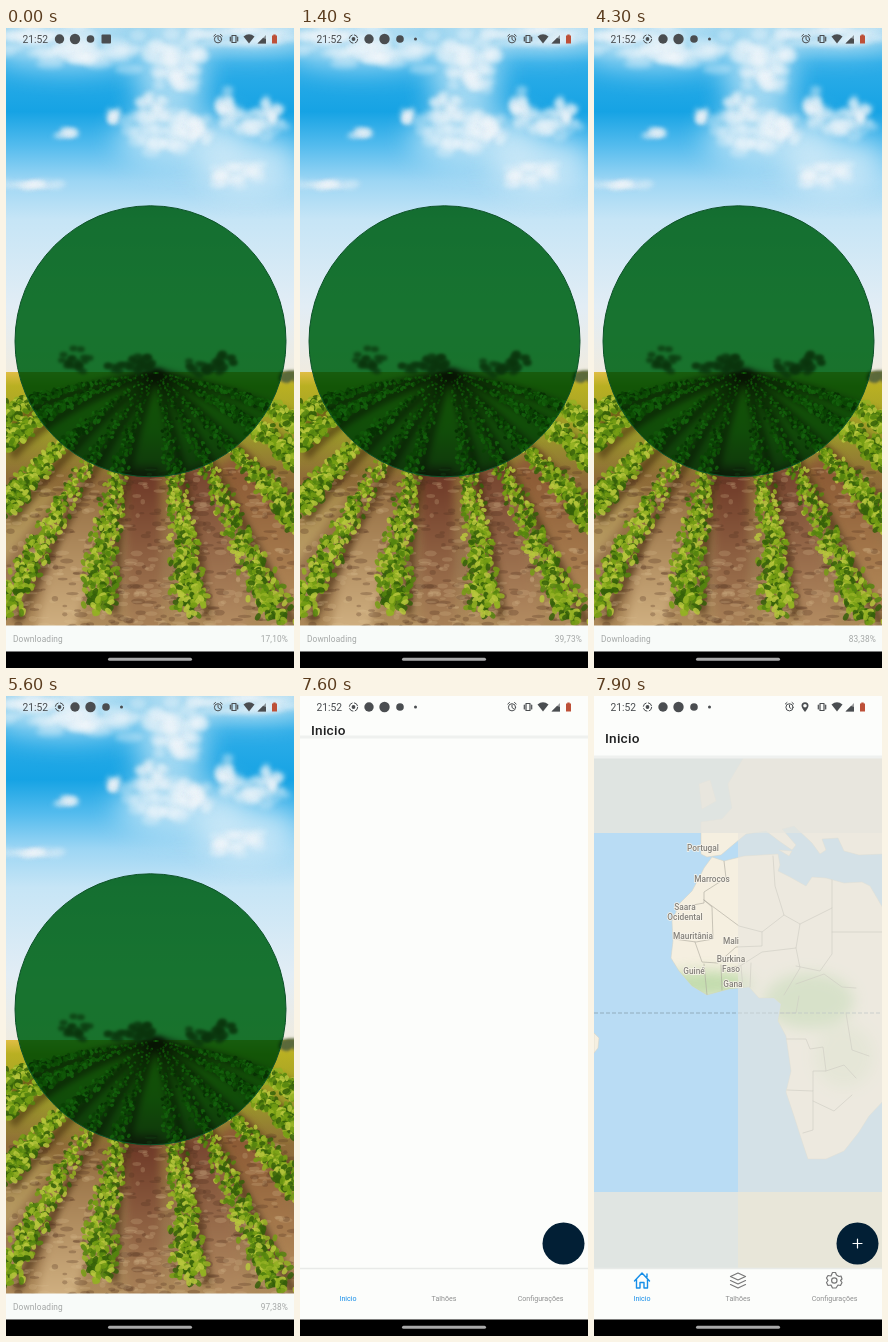
These frames come from a looping animation (288 by 640 pixels, 8000 ms). An HTML page with a canvas:

```html
<!DOCTYPE html>
<html lang="pt">
<head>
<meta charset="utf-8">
<style>
html, body { margin: 0; width: 100%; height: 100%; overflow: hidden; background: #fcfdfb; }
canvas, svg { position: absolute; left: 0; top: 0; display: block; }
text { font-family: Roboto, sans-serif; }
.line { fill: none; stroke-linejoin: round; stroke-linecap: round; }
.mid { text-anchor: middle; }
.places { font-size: 8.3px; font-weight: 500; fill: #85827c; paint-order: stroke; stroke: #f8f4ea; stroke-width: 1.5px; }
</style>
</head>
<body>
<canvas id="photo" width="288" height="640"></canvas>
<svg width="288" height="640" viewBox="0 0 288 640">
  <defs>
    <filter id="soft" x="-50%" y="-50%" width="200%" height="200%"><feGaussianBlur stdDeviation="7"/></filter>
    <clipPath id="mapClip"><rect y="61" width="288" height="512"/></clipPath>
    <clipPath id="landClip"><use href="#africa"/></clipPath>
  </defs>

  <g id="download">
    <rect y="597.5" width="288" height="26" fill="#f8fbf9"/>
    <g font-size="8.3" fill="#a3a6a5" letter-spacing=".15">
      <text x="7" y="613.5">Downloading</text>
      <text id="percent" x="282" y="613.5" text-anchor="end"></text>
    </g>
  </g>

  <g id="home">
    <rect width="288" height="624" fill="#fcfdfb"/>
    <g id="map" clip-path="url(#mapClip)">
      <rect y="61" width="288" height="512" fill="#b9dcf4"/>
      <g fill="#f5efe0" stroke="#d5d3c4" stroke-width=".5">
        <path id="africa" d="M118 161L130 165 150 160 184 158 186 169 184 175 196 181 212 190 218 181 232 182 250 187 268 186 276 190 290 214V404L275 420 265 436 250 455 232 463 214 463 208 445 200 420 192 396 197 375 192 340 184 325 187 308 180 302 165 302 155 291 135 293 113 299 98 290 85 275 77 262 79 245 78 225 86 207 98 195 106 180 110 172Z"/>
        <path d="M107 137L107 158 113 161 127 159 140 148 152 138 172 135 185 145 198 154 202 149 188 133 200 130 218 147 226 158 232 154 228 143 244 142 250 155 265 159 290 158V61H150L134 88 138 112 128 123 107 126Z"/>
        <path d="M105 88L116 84 122 105 108 113ZM185 154L198 155 195 160ZM0 337L5 342 4 352 0 357Z"/>
      </g>
      <g clip-path="url(#landClip)">
        <g fill="#b5d7a0" filter="url(#soft)" opacity=".8">
          <ellipse cx="112" cy="288" rx="48" ry="13"/>
          <ellipse cx="215" cy="305" rx="45" ry="28"/>
          <ellipse cx="250" cy="360" rx="30" ry="32" opacity=".35"/>
        </g>
        <path class="line" stroke="#aaa69a" stroke-width=".6" d="M130 165L132 182 110 196 110 207 88 211M110 204L145 230 168 236 190 219 181 190 179 160M110 204L118 211 119 243 102 246 80 243M101 246L108 266 124 267 142 251 168 250 168 236M190 219L206 228 202 252 168 256 146 270 128 273M206 228L238 212 238 182M238 236H290M238 212V258L226 275 202 270M202 252L206 272 190 299M202 288L230 278 248 291 262 292M184 317H202L205 300M190 343H212L216 353 229 351 232 375H219V395L193 394M219 395V434L209 437M232 375L250 369 262 382M219 405L240 415 258 399M252 317L258 354 275 360M110 268L113 299M127 269L128 294M147 270L149 292M157 267L156 291"/>
      </g>
      <path stroke="#8299a4" stroke-width=".7" stroke-dasharray="4 2" d="M0 317H288"/>
      <g fill="#e7e6de">
        <path d="M0 61H288V137H0Z" opacity=".85"/>
        <path d="M144 137H288V496H144Z" opacity=".58"/>
      </g>
      <path d="M0 496H144V573H0Z" fill="#e0e5e2"/>
      <path d="M144 496H288V573H144Z" fill="#e8e6d9"/>
      <g class="places mid" id="places"></g>
    </g>
    <g id="header">
      <rect width="288" height="41" fill="#fcfdfb"/>
      <path d="M0 41H288" stroke="#eff1ef" stroke-width="3"/>
      <text id="title" x="11" font-size="13.6" font-weight="500" letter-spacing=".25" fill="#1d1e1f">Inicio</text>
    </g>
    <rect width="288" height="22" fill="#fcfdfb"/>
    <rect y="572" width="288" height="52" fill="#fcfdfb"/>
    <path d="M0 572.5H288" stroke="#e8eae8" stroke-width="1.5"/>
    <circle cx="263.5" cy="547.5" r="21" fill="#021f35"/>
    <g class="mid" font-size="7.1" fill="#8f9090">
      <text x="48" y="604.5" fill="#168ee8">Inicio</text>
      <text x="144" y="604.5">Talhões</text>
      <text x="240.5" y="604.5">Configurações</text>
    </g>
    <g id="icons" class="line" stroke="#777" stroke-width="1.2">
      <path stroke="#fff" d="M259 547.5H268M263.5 543V552"/>
      <path stroke="#168ee8" stroke-width="1.4" d="M40.5 585L48 577 55.5 585M42.5 583.5V592H46V586.5H50V592H53.5V583.5M53 581V578"/>
      <path d="M136.5 580.5L144 577 151.5 580.5 144 584ZM136.5 584.5L144 588 151.5 584.5M136.5 588.5L144 592 151.5 588.5"/>
      <path d="M238.5 576.5H241.5L242.5 579 245 580.5 247 580 248 583 246.5 584.5 248 586.5 246.5 589.5 244 589 242 592H238.5L237 589 234 589.5 232.5 586.5 234 584.5 232.5 582 234 579.5 237 580Z"/>
      <circle cx="240.3" cy="584.5" r="2.7"/>
    </g>
  </g>

  <g id="status" fill="#4a4d50">
    <text x="16.5" y="14.7" font-size="10.3">21:52</text>
    <g id="apps">
      <circle cx="69" cy="11" r="4.7"/>
      <circle cx="84.5" cy="11" r="5.2"/>
      <circle cx="100" cy="11" r="3.8"/>
    </g>
    <rect id="screen" x="95.5" y="6.5" width="9.5" height="9" rx="1"/>
    <g id="recording">
      <circle cx="53.5" cy="11" r="4.2" fill="none" stroke="#4a4d50" stroke-dasharray="5 1.6"/>
      <circle cx="53.5" cy="11" r="1.9"/>
      <circle cx="115.5" cy="11" r="1.5"/>
    </g>
    <g id="alarm" class="line" stroke="#4a4d50">
      <circle cx="212" cy="11.3" r="3.6"/>
      <path d="M212 9V11.5L213.5 12.5M207.8 8L209.5 6.5M216.2 8L214.5 6.5"/>
    </g>
    <path id="pin" fill-rule="evenodd" d="M211 16Q207.5 11.5 207.5 9.8A3.5 3.5 0 0 1 214.5 9.8Q214.5 11.5 211 16ZM211 8A1.8 1.8 0 1 0 211 11.6 1.8 1.8 0 0 0 211 8Z"/>
    <path class="line" stroke="#4a4d50" stroke-width="1.2" d="M226 7.5H230V14.5H226ZM224.3 9V13M231.7 9V13"/>
    <path d="M237.5 8.5Q243 4 248.5 8.5L243 15.5Z"/>
    <path d="M260 7V15.5H251.5Z" opacity=".55"/>
    <path d="M260 11V15.5H251.5L257 10Z"/>
    <path d="M266 7.5H267.3V6.5H269.7V7.5H271V15.5H266Z" fill="#bd5038"/>
  </g>
  <path d="M0 623.5H288V640H0Z"/>
  <rect x="102" y="629.8" width="84" height="3" rx="1.5" fill="#a9a9a9"/>
</svg>

<script>
const $ = id => document.getElementById(id);
const g = $('photo').getContext('2d');

let seed = 7;
const random = () => (seed = seed * 16807 % 2147483647) / 2147483647;
const spread = r => (random() + random() - 1) * r;
const pick = list => list[random() * list.length | 0];

function ramp(y0, y1, stops) {
  const fill = g.createLinearGradient(0, y0, 0, y1);
  stops.forEach(([at, colour]) => fill.addColorStop(at, colour));
  return fill;
}

function band(y0, y1, stops) {
  g.fillStyle = ramp(y0, y1, stops);
  g.fillRect(0, y0, 288, y1 - y0);
}

function blob(x, y, rx, ry, colour, angle = 0) {
  g.fillStyle = colour;
  g.beginPath();
  g.ellipse(x, y, rx, ry, angle, 0, 7);
  g.fill();
}

function drawSky() {
  band(0, 348, [[0, '#8fd0ee'], [.1, '#2eade8'], [.24, '#16a3e4'], [.34, '#55bcee'], [.44, '#9dd6f4'],
    [.55, '#c6e5f6'], [.8, '#e2edf5'], [1, '#f0ebdf']]);
  g.filter = 'blur(14px)';
  for (const [x, y, rx, ry] of [[60, 18, 75, 22], [165, 45, 35, 50], [240, 8, 60, 14], [175, 110, 65, 28], [240, 135, 50, 28]])
    blob(x, y, rx, ry, 'rgba(238,246,250,.62)');
  g.filter = 'blur(2.5px)';
  const clouds = [[65, 27, 75, 18], [35, 8, 60, 12], [165, 22, 38, 24], [172, 48, 24, 18], [245, 8, 65, 10],
    [155, 102, 46, 23], [148, 80, 18, 14], [192, 98, 18, 18], [246, 94, 36, 16], [218, 78, 12, 18], [266, 84, 12, 14],
    [233, 147, 36, 12], [60, 105, 12, 5], [107, 88, 6, 8], [30, 156, 38, 4]];
  for (const [x, y, rx, ry] of clouds)
    for (let i = 0; i < 32; i++)
      blob(x + spread(rx), y + spread(ry), rx * .16 + 2, ry * .22 + 1, 'rgba(247,250,251,.32)');
  g.filter = 'none';
}

function drawTrees() {
  g.filter = 'blur(1.5px)';
  for (const [x, y, rx, ry] of [[70, 333, 20, 14], [120, 338, 28, 9], [135, 333, 14, 10], [200, 340, 34, 8], [215, 335, 16, 11], [284, 349, 10, 6]])
    for (let i = 0; i < 20; i++)
      blob(x + spread(rx), y + spread(ry), 4, 3, '#5c6a3cb0');
  g.filter = 'none';
}

function drawField() {
  band(344, 622, [[0, '#e0bd45'], [.05, '#b9b022'], [.22, '#9c9a2a'], [.38, '#8f6c38'], [.7, '#9a7650'], [1, '#b6935f']]);
  g.filter = 'blur(4px)';
  const furrows = [[42, 460, -20, 540, 22, '#a38646', '#cdb083'], [86, 450, 48, 610, 40, '#8f683c', '#d0b081'],
    [137, 440, 138, 610, 34, '#6f3a28', '#a98258'], [188, 440, 228, 610, 34, '#784731', '#b48d62'],
    [226, 430, 310, 590, 32, '#8d5c36', '#b9925f']];
  for (const [x0, y0, x1, y1, width, near, far] of furrows) {
    g.lineWidth = width;
    g.strokeStyle = ramp(450, 600, [[0, near], [1, far]]);
    g.beginPath();
    g.moveTo(x0, y0);
    g.lineTo(x1, y1);
    g.stroke();
  }
  // Crop rows bend out from the vanishing point: control x, y and end x, y
  const rows = [[20, 362, -10, 394], [40, 372, -10, 422], [60, 402, -10, 487], [75, 430, -5, 588], [100, 440, 92, 580],
    [172, 440, 186, 582], [200, 425, 272, 592], [225, 415, 300, 500], [235, 380, 300, 437], [258, 366, 300, 402]];
  g.filter = 'blur(3px)';
  g.lineWidth = 9;
  g.strokeStyle = '#42280fa0';
  for (const [cx, cy, ex, ey] of rows) {
    g.beginPath();
    g.moveTo(150, 345);
    g.quadraticCurveTo(cx + 9, cy + 6, ex + 16, ey + 6);
    g.stroke();
  }
  g.filter = 'blur(.7px)';
  for (let i = 0; i < 700; i++)
    blob(random() * 288, 440 + 180 * random(), 2 + random() * 5, 1 + random() * 2, pick(['#dcc09038', '#53321f48']));
  const leaves = ['#35600a', '#55840f', '#759d14', '#94b124', '#b7c63c'];
  for (const [cx, cy, ex, ey] of rows)
    for (let i = 0; i < 480; i++) {
      const s = Math.sqrt(i / 480), r = 1 - s;
      const x = r * r * 150 + 2 * r * s * cx + s * s * ex;
      const y = r * r * 345 + 2 * r * s * cy + s * s * ey;
      blob(x + spread(3 + 19 * s), y + spread(8 * s), 1 + 3 * s, 1 + 1.6 * s, pick(leaves) + 'd8', random() * 3);
    }
  for (let i = 0; i < 260; i++)
    blob(random() * 288, 599 + random() * 22, 2 + random() * 4, 1 + random() * 2, pick(['#7b5c34', '#b8975f', '#5f4a25', '#c9aa74']));
  g.filter = 'none';
  g.fillStyle = '#f3f4f0';
  g.fillRect(0, 620.5, 288, 4);
}

function drawDisc() {
  g.globalCompositeOperation = 'multiply';
  blob(144.5, 313.3, 135.5, 135.5, 'rgb(26,124,50)');
  g.globalCompositeOperation = 'source-over';
  g.lineWidth = 1;
  g.strokeStyle = '#0d5229';
  g.stroke();
}

drawSky();
drawField();
drawTrees();
drawDisc();

const places = [['Portugal', 109, 155], ['Marrocos', 118, 186], ['Saara', 91, 214], ['Ocidental', 91, 223.5],
  ['Mauritânia', 99, 243], ['Mali', 137, 248], ['Burkina', 137, 265.5], ['Faso', 137, 275.5],
  ['Guiné', 100, 278], ['Gana', 139, 290.5]];
$('places').innerHTML = places.map(([name, x, y]) => `<text x="${x}" y="${y}">${name}</text>`).join('');

const progress = [[0, 17.1], [1400, 39.73], [2900, 68.31], [5600, 97.38], [5900, 100], [8000, 100]];
function percentAt(t) {
  const i = progress.findIndex(p => p[0] > t);
  const [t0, p0] = progress[i - 1], [t1, p1] = progress[i];
  return p0 + (p1 - p0) * (t - t0) / (t1 - t0);
}

const show = (id, on) => $(id).setAttribute('display', on ? 'inline' : 'none');
const move = (id, x, y) => $(id).setAttribute('transform', `translate(${x} ${y})`);

function frame() {
  const t = performance.now() % 8000;
  const recording = t >= 500, loaded = t >= 7700, located = t >= 7800;
  $('percent').textContent = percentAt(Math.floor(t / 100) * 100).toFixed(2).replace('.', ',') + '%';
  show('download', t < 6000);
  show('home', t >= 7600);
  show('icons', loaded);
  show('map', located);
  show('places', t >= 7900);
  show('pin', located);
  show('recording', recording);
  show('screen', !recording);
  move('apps', recording ? 0 : -15.5, 0);
  move('alarm', located ? -16.5 : 0, 0);
  move('header', 0, loaded ? 20 : 0);
  $('title').setAttribute('y', loaded ? 26.5 : 39);
  requestAnimationFrame(frame);
}
frame();
</script>
</body>
</html>
```
